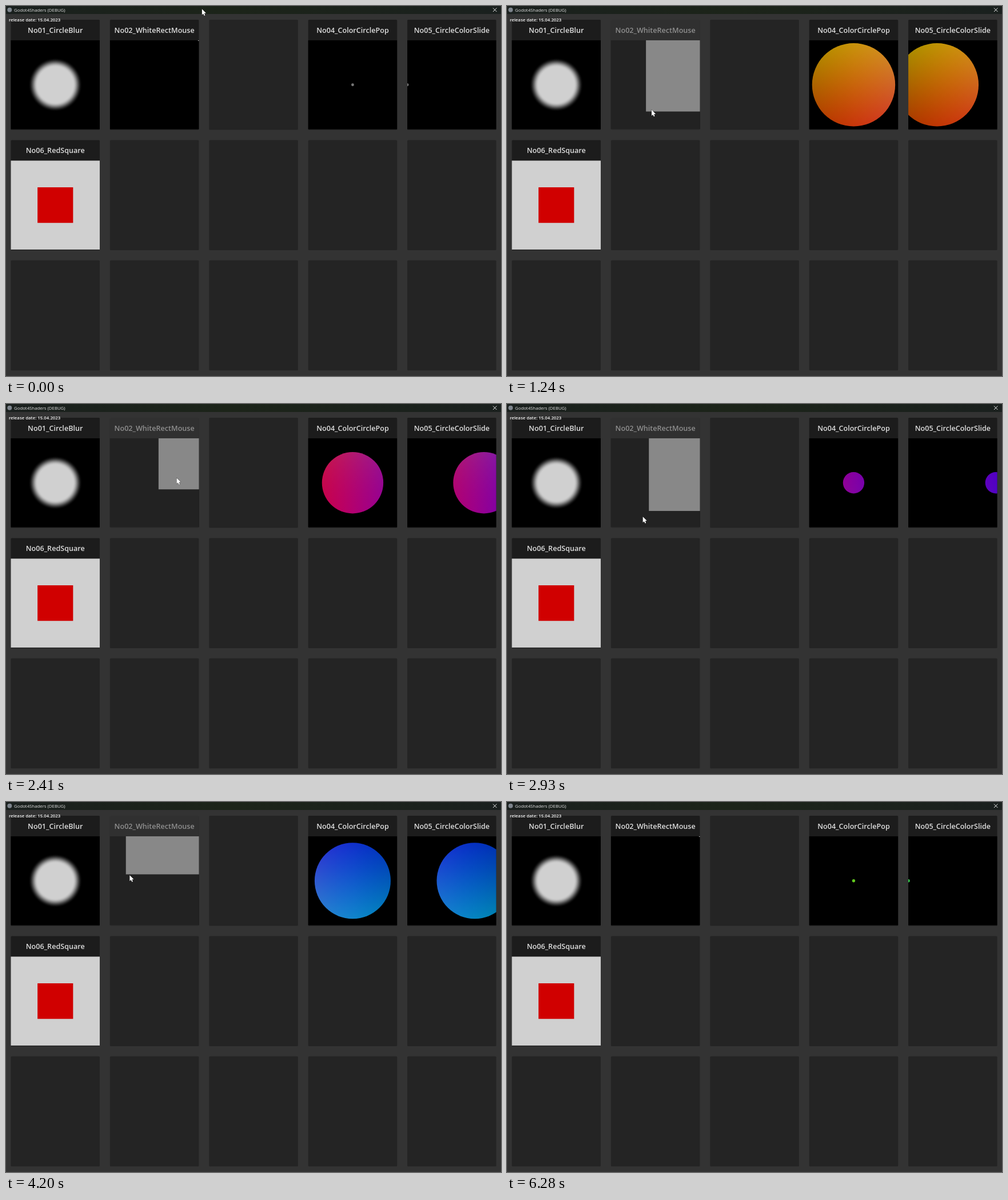
An HTML page with a canvas that plays this animation: 866 px wide and 647 px high, repeating every 6.33 s.

```html
<!DOCTYPE html>
<html lang="en">
<head>
<meta charset="utf-8">
<title>Godot4Shaders (DEBUG)</title>
<style>
  html, body { margin: 0; width: 866px; height: 647px; overflow: hidden; background: #333; }
  canvas { display: block; }
</style>
</head>
<body>
<canvas id="stage" width="866" height="647"></canvas>
<script>
const ctx = document.getElementById('stage').getContext('2d');
const LOOP = 6330;
const SIZE = 155.5, HEAD = 36, CARD = 192.5;
const WHITE = 208;
const FONT = '"Open Sans", "Noto Sans", sans-serif';
const LABELS = [
  'No01_CircleBlur', 'No02_WhiteRectMouse', '', 'No04_ColorCirclePop',
  'No05_CircleColorSlide', 'No06_RedSquare'
];
const ARROW = new Path2D('M0 0V10.3L2.3 8.3L4 11.8L5.6 11L4.1 7.7L7.2 7.4Z');

// Turning points of the pointer: time in ms, x, y
const PATH = [
  [0, 343, 5], [850, 219, 140], [1180, 243, 184.5], [1530, 300, 140],
  [1950, 205, 125], [2220, 222, 182], [2350, 266.5, 149.5], [2460, 312, 122],
  [3100, 215, 217], [3320, 235, 185], [3520, 255, 140], [3950, 148, 130],
  [4140, 209.5, 126.5], [4240, 222, 127], [4500, 303, 98], [5280, 334, 63],
  [5450, 342, 25], [5600, 346, -20]
];
const LAST = PATH.length - 1;

const clamp = (v, lo, hi) => Math.min(hi, Math.max(lo, v));

function slope(i, k) {
  const a = PATH[Math.max(0, i - 1)], b = PATH[Math.min(LAST, i + 1)];
  return (b[k] - a[k]) / (b[0] - a[0]);
}

// Smooth curve through the turning points
function pointer(t) {
  t = clamp(t, 0, PATH[LAST][0]);
  let i = 0;
  while (i < LAST - 1 && PATH[i + 1][0] <= t) i++;
  const a = PATH[i], b = PATH[i + 1], d = b[0] - a[0], u = (t - a[0]) / d;
  const at = k => a[k] + (b[k] - a[k]) * u * u * (3 - 2 * u)
    + d * u * (1 - u) * ((1 - u) * slope(i, k) - u * slope(i + 1, k));
  return { x: at(1), y: at(2) };
}

function rect(x, y, w, h, color) {
  ctx.fillStyle = color;
  ctx.fillRect(x, y, w, h);
}

function disc(x, y, r, color) {
  ctx.fillStyle = color;
  ctx.beginPath();
  ctx.arc(x, y, r, 0, 7);
  ctx.fill();
}

function text(str, x, y, size, weight, color, align) {
  ctx.font = `${weight} ${size}px ${FONT}`;
  ctx.textAlign = align;
  ctx.fillStyle = color;
  ctx.fillText(str, x, y);
}

function fillStops(gradient, color) {
  for (let k = 0; k <= 8; k++) gradient.addColorStop(k / 8, color(k / 8));
  return gradient;
}

function blurDisc(x, y) {
  const outer = SIZE * 0.3;
  const g = ctx.createRadialGradient(x, y, SIZE * 0.2, x, y, outer);
  disc(x, y, outer, fillStops(g, u => {
    const v = WHITE * (1 - u * u * (3 - 2 * u));
    return `rgb(${v},${v},${v})`;
  }));
}

const wave = a => WHITE * (0.5 + 0.5 * Math.cos(a));

// Red and blue vary across the square, green varies downwards.
function colorDisc(x, y, cx, a, gray) {
  const cy = y + SIZE / 2, r = Math.abs(Math.sin(a)) * SIZE / 2, phase = a - 2.1;
  ctx.save();
  ctx.beginPath();
  ctx.rect(x, y, SIZE, SIZE);
  ctx.clip();
  if (gray) {
    disc(cx, cy, r, '#777');
  } else {
    const across = ctx.createLinearGradient(x, 0, x + SIZE, 0);
    const down = ctx.createLinearGradient(0, y, 0, y + SIZE);
    ctx.globalCompositeOperation = 'lighter';
    disc(cx, cy, r, fillStops(across, u => `rgb(${wave(phase + u)},0,${wave(phase + u + 4)})`));
    disc(cx, cy, r, fillStops(down, u => `rgb(0,${wave(phase + u + 2)},0)`));
  }
  ctx.restore();
}

// The rectangle trails the pointer slightly.
function mouseRect(x, y, t) {
  const m = pointer(t - 60), right = x + SIZE;
  const left = clamp(m.x, x, right - 1.5), bottom = clamp(m.y, y + 1, y + SIZE);
  rect(left, y, right - left, bottom - y, '#d0d0d0');
}

function shader(i, x, y, t) {
  const a = t / 1000 - 0.032, half = SIZE / 2, gray = t < 50;
  rect(x, y, SIZE, SIZE, i === 5 ? '#d0d0d0' : '#000');
  if (i === 0) blurDisc(x + half, y + half);
  if (i === 1) mouseRect(x, y, t);
  if (i === 3) colorDisc(x, y, x + half, a, gray);
  if (i === 4) colorDisc(x, y, x + half * (1 - Math.cos(a)), a, gray);
  if (i === 5) rect(x + SIZE * 0.3, y + SIZE * 0.3, SIZE * 0.4, SIZE * 0.4, '#d00000');
}

function drawCard(i, t, m) {
  const x = 8.5 + (i % 5) * 173.4, y = 24 + Math.floor(i / 5) * 210.4;
  const label = LABELS[i];
  ctx.fillStyle = label ? '#1c1c1c' : '#242424';
  ctx.beginPath();
  ctx.roundRect(x, y, SIZE, CARD, 1.5);
  ctx.fill();
  if (!label) return;
  text(label, x + SIZE / 2, y + 22.5, 12.6, 600, '#dedede', 'center');
  shader(i, x, y + HEAD, t);
  const hover = m.x >= x && m.x <= x + SIZE && m.y >= y && m.y <= y + CARD;
  if (hover) rect(x, y, SIZE, CARD, 'rgba(67,67,67,0.51)');
}

function titleBar() {
  const g = ctx.createLinearGradient(0, 0, 866, 0);
  g.addColorStop(0, '#1a201e');
  g.addColorStop(0.45, '#1c2419');
  g.addColorStop(1, '#1a201e');
  rect(0, 0, 866, 14, g);
  disc(6.3, 6.7, 4, '#7d848c');
  text('Godot4Shaders (DEBUG)', 14, 9.5, 7.8, 400, '#e4e4e4', 'left');
  ctx.strokeStyle = '#e8e8e8';
  ctx.lineWidth = 1;
  ctx.beginPath();
  ctx.moveTo(852, 3.5);
  ctx.lineTo(858.5, 10);
  ctx.moveTo(858.5, 3.5);
  ctx.lineTo(852, 10);
  ctx.stroke();
}

function arrow({ x, y }) {
  ctx.save();
  ctx.translate(x, y);
  ctx.strokeStyle = 'rgba(0,0,0,0.6)';
  ctx.lineWidth = 1;
  ctx.stroke(ARROW);
  ctx.fillStyle = '#fff';
  ctx.fill(ARROW);
  ctx.restore();
}

function draw(t) {
  const m = pointer(t);
  rect(0, 0, 866, 647, '#333');
  for (let i = 0; i < 15; i++) drawCard(i, t, m);
  titleBar();
  text('release date: 15.04.2023', 5, 27, 7.8, 600, '#fff', 'left');
  arrow(m);
}

const start = performance.now();
function frame() {
  draw((performance.now() - start) % LOOP);
  requestAnimationFrame(frame);
}
frame();
</script>
</body>
</html>
```
